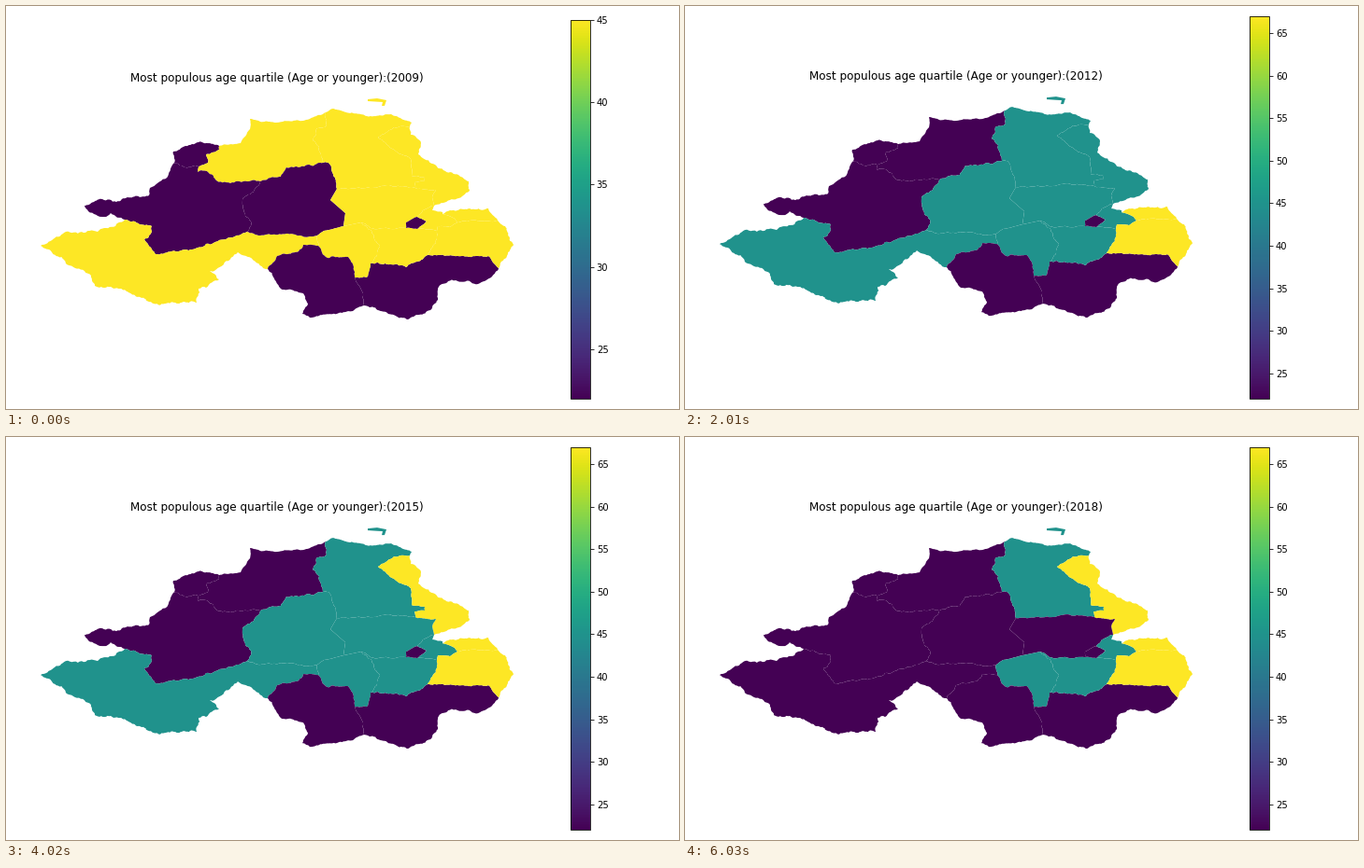
A matplotlib script for the animation above (9.38 s loop, 720 by 432 pixels).

```python
import numpy as np
import matplotlib.pyplot as plt
from matplotlib.animation import FuncAnimation
from matplotlib.colors import Normalize
from matplotlib.patches import Polygon

plt.rcParams["font.family"] = "DejaVu Sans"
W, H, DPI = 720, 432, 72
FIRST_YEAR, LAST_YEAR = 2009, 2018
STEPS, STEP_MS = 14, 670
LOW, MID, HIGH = 22, 45, 67

# Layout: a padded box shared by the map (80 %) and the scale bar (15 %)
PAD = 10.8
BOX = W - 2 * PAD
MAP_CENTER = PAD + 0.4 * BOX
BAR_LEFT = PAD + 0.85 * BOX

# Age quartiles: the starting state, then what changes in each year
CODES = "F EL WT FS MU NA EA SA UB NW SD LV WB BE ND ST".split()
START = dict.fromkeys(CODES, MID) | dict.fromkeys(
    "F WT MU NW SD WB".split(), LOW)
CHANGES = {
    2010: dict(EL=LOW, EA=LOW, MU=MID),
    2011: dict(ND=HIGH, ST=HIGH),
    2012: dict(EA=MID),
    2013: dict(EA=HIGH),
    2016: dict(MU=LOW),
    2017: dict(SA=LOW),
    2018: dict(FS=LOW),
}

# Points where borders meet each other or the coast
NODES = dict(
    a=(228, 150), b=(180, 168), c=(206, 172), d=(272, 188), e=(342, 114),
    f=(339, 168), g=(354, 196), h=(361, 236), i=(333, 246), j=(258, 242),
    k=(127, 229), l=(280, 282), m=(334, 257), n=(373, 291), o=(390, 276),
    p=(380, 232), q=(451, 267), r=(527, 281), s=(383, 321), t=(432, 129),
    u=(438, 195), v=(458, 214), w=(440, 226), x=(428, 238), y=(440, 239),
    z=(467, 223), A=(461, 241), B=(526, 230), C=(483, 232),
)
rng = np.random.default_rng(7)
borders = []


def fractal(p, q, amp):
    """Midpoint displacement from p up to, but without, q."""
    d = q - p
    size = np.hypot(*d)
    if size < 2.5:
        return [p]
    shift = rng.uniform(-1, 1) * amp * min(0.16, 1.4 / size)
    mid = (p + q) / 2 + shift * np.array([-d[1], d[0]])
    return fractal(p, mid, amp) + fractal(mid, q, amp)


def border(sides, ends, *via, amp=1.0):
    """A rough line between two nodes that bounds the named regions."""
    keys = [NODES[ends[0]], *via, NODES[ends[1]]]
    keys = np.array(keys, float)
    line = sum((fractal(p, q, amp) for p, q in zip(keys, keys[1:])), [])
    borders.append((sides.split(), ends, line + [keys[-1]]))


def ring(code):
    """Join all lines that bound a region end to end."""
    rest = [(ends, line) for sides, ends, line in borders if code in sides]
    ends, path = rest.pop(0)
    tip = ends[1]
    while rest:
        i = next(i for i, (e, _) in enumerate(rest) if tip in e)
        ends, line = rest.pop(i)
        if ends[0] == tip:
            tip, path = ends[1], path + line
        else:
            tip, path = ends[0], path + line[::-1]
    return path


# Coast and outer border
border("F", "ba", (179, 156), (192, 150), (206, 146))
border("EL", "ae", (251, 147), (261, 132), (261, 121), (272, 124),
       (318, 123), amp=0.6)
border("NA", "et", (350, 110), (390, 118), (412, 116), (434, 125), amp=0.7)
border("EA", "tv", (433, 138), (444, 147), (441, 159), (470, 177),
       (484, 181), (495, 188), (496, 198), (488, 204))
border("BE", "vz", (456, 219), (467, 221), amp=0.4)
border("ND", "zB", (475, 219), (516, 217))
border("ST", "Br", (534, 236), (543, 256), (537, 264))
border("SD", "rs", (520, 290), (505, 298), (473, 295), (463, 301),
       (462, 315), (454, 326), (430, 336))
border("NW", "sl", (371, 327), (325, 334), (317, 330), (323, 319),
       (318, 308), (293, 302))
border("FS", "lk", (248, 264), (218, 284), (228, 293), (214, 302),
       (206, 303), (204, 318), (158, 319), (122, 303), (95, 300), (91, 289),
       (62, 272), (37, 257), (64, 242), (98, 242), amp=1.2)
border("WT", "kb", (112, 222), (105, 226), (88, 220), (84, 214), (103, 207),
       (118, 210), (130, 205), (153, 203), (154, 195), (171, 185))

# North-west
border("F EL", "ac", (228, 154), (214, 159), (216, 168))
border("F WT", "bc", (192, 173))
border("EL WT", "cd", (205, 178), (216, 178), (224, 186), (240, 190))
border("EL NA", "ef", (343, 128), (333, 131), (328, 144), (335, 151))
border("EL MU", "fd", (300, 173), (294, 183))
border("WT MU", "dj", (261, 202), (253, 208), (256, 225), (262, 231))
border("WT FS", "jk", (222, 254), (160, 266), (148, 250), (156, 242),
       (156, 236))

# Centre
border("MU FS", "ji", (270, 246), (300, 244), (325, 247), amp=0.7)
border("MU NA", "fg", (345, 168), (352, 184))
border("MU SA", "gh", (347, 208), (363, 222), amp=0)
border("MU UB", "hi", (340, 241), amp=0.2)
border("SA UB", "hp", amp=0)
border("UB FS", "im")
border("UB LV", "po", (390, 240), (400, 258), (394, 271))
border("UB NW", "mn", (344, 270), (366, 269), (372, 280))
border("UB SD", "no", (386, 291))
border("FS NW", "lm", (290, 268), (313, 263), (318, 256))
border("NW SD", "ns", (380, 304))

# East
border("NA EA", "tu", (415, 130), (398, 141), (413, 153), (433, 164),
       (434, 182), (448, 184), (448, 188), (437, 189), amp=0.7)
border("NA SA", "gu", (392, 195), (408, 192), amp=0.7)
border("EA SA", "uv", (460, 197), (456, 205), amp=0.7)
border("SA BE", "vw", (446, 219), amp=0.7)
border("SA WB", "wx", (428, 232), amp=0.5)
border("SA LV", "xp", (390, 238), amp=0.7)
border("WB LV", "xy", amp=0.5)
border("WB BE", "wy", (450, 231), amp=0.5)
border("LV BE", "yA", amp=0.5)
border("LV ST", "Aq", (461, 249))
border("LV SD", "oq", (398, 275), (428, 280))
border("BE ND", "zC", (480, 228), amp=0.5)
border("BE ST", "CA", (475, 237), (462, 236), amp=0.5)
border("ND ST", "CB", amp=0.7)
border("ST SD", "qr", (495, 269), (516, 268), amp=0.7)

ISLAND = [(387, 100), (397, 99), (407, 101), (405, 107), (402, 107),
          (403, 103), (387, 102)]


def ages(year):
    state = dict(START)
    for since, change in CHANGES.items():
        if since <= year:
            state |= change
    return state


fig = plt.figure(figsize=(W / DPI, H / DPI), dpi=DPI, facecolor="white")
ax = fig.add_axes([0, 0, 1, 1])
ax.set_xlim(0, W)
ax.axis("off")

patches = []
for code, shape in [(c, ring(c)) for c in CODES] + [("NA", ISLAND)]:
    patch = Polygon(shape, closed=True, linewidth=0, edgecolor="none")
    ax.add_patch(patch)
    patches.append((code, patch))
title = ax.text(MAP_CENTER, 81.1, "", fontsize=12, ha="center",
                va="baseline")


def scale_bar(vmax, top):
    height = H - PAD - top
    cax = fig.add_axes([BAR_LEFT / W, PAD / H, height / 20 / W, height / H])
    mappable = plt.cm.ScalarMappable(Normalize(LOW, vmax), "viridis")
    fig.colorbar(mappable, cax=cax, ticks=range(25, vmax + 1, 5))
    cax.tick_params(labelsize=10)
    return cax, mappable


short_bar = scale_bar(MID, 14.7)
long_bar = scale_bar(HIGH, PAD)


def draw(step):
    year = min(FIRST_YEAR + step, LAST_YEAR)
    state = ages(year)
    wide = HIGH in state.values()
    short_bar[0].set_visible(not wide)
    long_bar[0].set_visible(wide)
    mappable = (long_bar if wide else short_bar)[1]
    lift = 1.9 if wide else 0
    ax.set_ylim(H + lift, lift)
    for code, patch in patches:
        patch.set_facecolor(mappable.to_rgba(state[code]))
    title.set_text(f"Most populous age quartile (Age or younger):({year})")
    return []


anim = FuncAnimation(fig, draw, frames=STEPS, interval=STEP_MS, repeat=True,
                     repeat_delay=0, blit=False)
plt.show()
```
